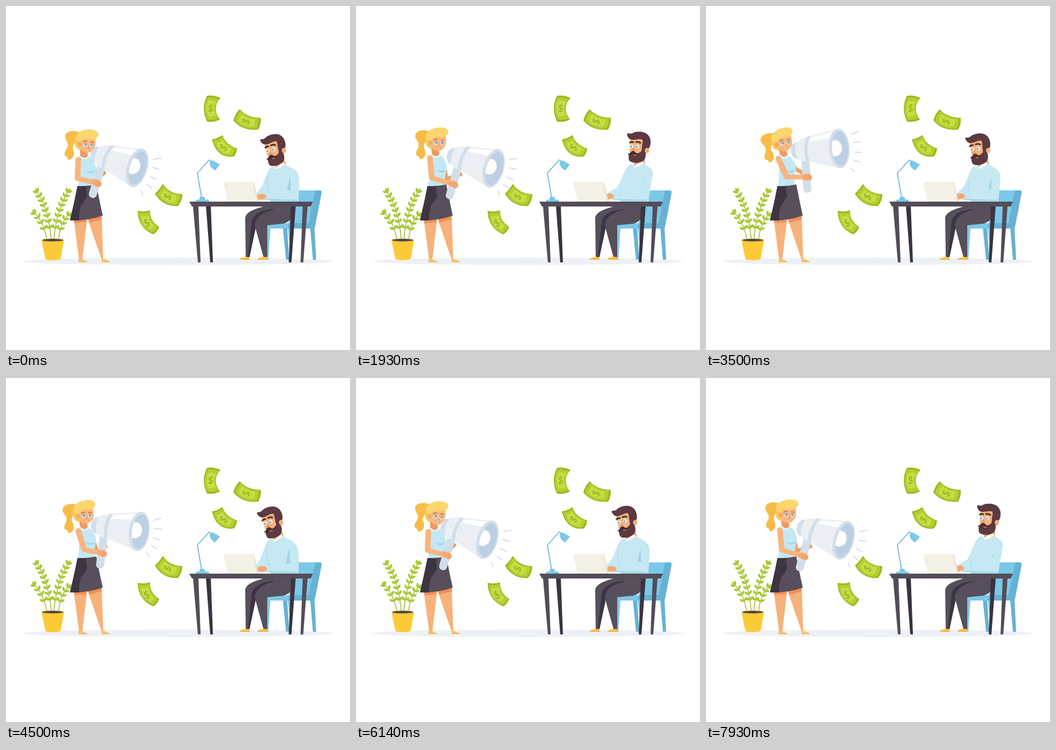
Recreate the animation shown at these times as an HTML page. Size 640 by 640 pixels, loop 8000 ms.

```html
<!DOCTYPE html>
<html lang="en">
<head>
<meta charset="utf-8">
<title>Promotion</title>
<style>
html,body{margin:0;width:100%;height:100%;overflow:hidden;background:#fff}
svg{display:block;width:100vw;height:100vh}
</style>
</head>
<body>
<svg viewBox="0 0 640 640">
<defs><clipPath id="mouth"><ellipse cx="1.5" rx="15" ry="32"/></clipPath></defs>
<ellipse cx="320" cy="475" rx="288" ry="7" fill="#edf0f4"/>

<g id="plant"></g>
<path d="M66 436H108L102 469Q101 473 87 473T73 469Z" fill="#fbcb37"/>
<ellipse cx="87" cy="436" rx="21" ry="3.2" fill="#fbcb37"/>
<ellipse cx="87" cy="435.6" rx="19.5" ry="2.5" fill="#5c4543"/>
<g id="sprouts"></g>

<g id="bills"></g>

<!-- chair -->
<path d="M566 412H574L577 472H571ZM515 412H523L527 472H521Z" fill="#66b2d4"/>
<path d="M486 412H492L488 472H484ZM538 412H531L527 440 524 412Z" fill="#7cc8e8"/>
<path d="M530 343H583Q588 343 587 348L575 410Q574 414 569 414H486V404H526Z" fill="#7cc8e8"/>
<path d="M575 343H583Q588 343 587 348L575 410Q574 414 569 414H524L526 404H563Z" fill="#66b2d4"/>

<!-- seated legs -->
<path d="M482 372C462 378 446 383 445 395L446 467H453L466 400 505 380Z" fill="#574f5b"/>
<path d="M498 378C475 379 459 388 457 402L450 467H453L467 402 500 392Z" fill="#3d3542"/>
<path d="M480 372H537Q536 400 516 405L486 408 486 467H479L463 409C463 395 476 383 500 379Z" fill="#574f5b"/>
<path id="shoeB" d="M435 472Q437 467 447 467H453V472Z" fill="#fcc23c"/>
<path d="M435 471H453V472H435Z" fill="#ee9c3a"/>
<g id="toe"><path d="M468 472Q470 467 480 467H487V472Z" fill="#fcc23c"/><path d="M468 471H487V472H468Z" fill="#ee9c3a"/></g>

<!-- man -->
<g id="neckM"><path d="M-25 15L-4 4-3 26-22 29Z" fill="#ee9a62"/></g>
<path id="torsoM" fill="#c5e8f3"/>
<path id="foldM" fill="#9fd5e6"/>
<path id="seamM" fill="none" stroke="#a8dae9" stroke-width="1"/>
<path d="M479 358.5L541 360.5 545 364H476Z" fill="#a5d8e8"/>
<path id="collarM" fill="#fff"/>
<g id="headM">
<path d="M-32-21H-7L-3 6-12 18-32 12Z" fill="#f8b27a"/>
<path d="M-38-30C-36-33-32-28-27-32C-20-36-4-36 2-28C7-22 7-14 5-7L1-1-7 1-9-20C-16-23-24-17-32-20C-35-21-38-26-38-30Z" fill="#5b3a41"/>
<path d="M-9-14L-2-8-2 10Q-3 18-9 21Q-22 26-31 21Q-35 18-33 7Q-28 3-24 5Q-17 8-10 1Z" fill="#5b3a41"/>
<path d="M-27 8Q-22 5-17 8Q-21 12-27 8Z" fill="#f2a36c"/>
<path d="M-36 7Q-33 8-28 2Q-25 0-22 3Q-18 8-13 6Q-17 11-24 8Q-32 12-36 7Z" fill="#4a2e35"/>
<path d="M-25-7L-28 0Q-27 3-23 1Z" fill="#ee945f"/>
<circle cx="-29" cy="-7" r="3.3" fill="#fff"/><circle cx="-18" cy="-7" r="3.4" fill="#fff"/>
<circle cx="-29.6" cy="-6.7" r="2" fill="#5ea6dc"/><circle cx="-18.8" cy="-6.7" r="2" fill="#5ea6dc"/>
<path d="M-33-13Q-29-17-25-14M-22-15Q-16-17-12-13" fill="none" stroke="#4a2e35" stroke-width="3"/>
<ellipse rx="4" ry="5" fill="#f8b27a"/><path d="M-1-2Q2-2 1 2" fill="none" stroke="#ee945f"/>
</g>
<g id="handM" fill="#f5a86e"><ellipse rx="9" ry="5.2"/><path d="M-10 6Q-9-1-2-1L3 5Q-4 7-10 6Z"/></g>

<!-- desk -->
<path d="M468 360L491 361 493 364H466Z" fill="#f7f6f0"/>
<path d="M407 328H459Q461 328 462 330L470 364H413L405 331Q405 328 407 328Z" fill="#e4e1d2"/>
<path d="M407 328.500H457Q459 328.500 460 330L467 364H412L405 331Q405 328.500 407 328.500Z" fill="#f3f1e5"/>
<path d="M364 357L356 311 378 286.500 385 290" fill="none" stroke="#67b5d9" stroke-width="1.7"/>
<path d="M353 364Q353 360 357 360H360V357Q360 355 362 355H368Q370 355 370 357V360H374Q378 360 378 364ZM379 292Q380 287 386 288L398 295 389 306Q379 300 379 292Z" fill="#7cc8e8"/>
<path d="M372 372H381L385 477H380ZM530 372H539L531 477H526Z" fill="#3b3340"/>
<path d="M341 364H571L567 373H346ZM348 373H358L362 477H357ZM552 373H561L553 477H548Z" fill="#544c58"/>

<!-- woman: legs -->
<path d="M126 396H151L142 472H136ZM152 396L178 390 181 472H178Z" fill="#f6b27a"/>
<path d="M126 398H150L149 402 127 404ZM153 397L178 391V397L155 403Z" fill="#f08f58"/>
<path d="M135 471H142L151 475.500H135ZM178 471H184L193 475.500H178Z" fill="#fcc758"/>
<path d="M135 475H151V476.300H135ZM178 475H193V476.300H178Z" fill="#eda03f"/>

<path id="farArm" fill="none" stroke="#ee9f66" stroke-width="7.500" stroke-linecap="round" stroke-linejoin="round"/>
<g id="headW">
<path d="M136 235C124 230 111 233 110 242C110 250 117 254 115 261C113 267 108 270 109 277C111 281 115 279 114 283C114 286 118 287 122 284C128 279 127 272 125 267C122 260 129 252 136 246Z" fill="#f7bc47"/>
<path d="M138 262H152V280Q145 286 138 280Z" fill="#f09a62"/>
<path d="M130 244C132 231 160 225 170 236L166 248H142L139 268C130 268 125 255 130 244Z" fill="#f6ca57"/>
<path d="M139 245H166Q168 258 164 265Q158 274 150 273Q139 271 138 262Z" fill="#f9b980"/>
<ellipse cx="137" cy="257" rx="3.500" ry="4.500" fill="#f4a66f"/>
<path d="M130 243C132 228 170 225 172 238C173 245 163 249 156 248C149 247 142 246 140 253C134 254 130 249 130 243Z" fill="#fbd66c"/>
<path d="M143.500 253Q147 250 151 252M157 253.500Q160 252 163 255" fill="none" stroke="#b5703c" stroke-width="1.600"/>
<g id="eyesOpen">
<circle cx="147.500" cy="258" r="3.200" fill="#fff"/><circle cx="158.500" cy="259.500" r="3.200" fill="#fff"/>
<circle cx="148" cy="258" r="2.100" fill="#5a9fd8"/><circle cx="159" cy="259.500" r="2.100" fill="#5a9fd8"/>
<path d="M144 256.500Q147 253.500 151 256.500M155.500 257.500Q159 255 162 258" fill="none" stroke="#9b6a50" stroke-width=".8"/>
</g>
<g id="eyesShut" fill="none" stroke="#b5764b" stroke-width="1"><path d="M144 258Q147.500 261 151 258M155.500 259Q159 262 162 260"/></g>
<path d="M154 259L155.500 264H152" fill="none" stroke="#ee945f" stroke-width="1.300"/>
<path d="M146 266Q151 269 156 268Q151 273 146 266Z" fill="#fff" stroke="#e2774f" stroke-width=".6"/>
</g>
<g id="torsoW">
<path d="M136 281L139 279Q146 286 153 280Q161 284 164 292Q169 300 167 308Q164 316 165 334L134 336Q137 316 136 281Z" fill="#c3e8f4"/>
<path d="M139 279Q146 286 153 280L154 282Q146 289 137 281Z" fill="#e8f6fb"/>
<path d="M146 306Q157 310 165 306Q160 316 146 306Z" fill="#9dd5e8"/>
</g>
<path d="M133 335Q150 336 168 332Q174 363 180 390Q152 400 119 399Q127 366 133 335Z" fill="#574f5b"/>
<path d="M133 335L150 335.500Q148 346 151 353Q148 362 140 370Q135 385 136 399L119 399Q127 366 133 335Z" fill="#3d3542"/>

<g id="mega">
<rect x="-72" y="8" width="15" height="70" rx="7" fill="#d2dee9"/>
<path d="M-77-17C-95-18-95 14-77 15Z" fill="#d2dee9"/>
<path d="M-79-17Q-72-23-57-25L-60 21Q-72 19-79 14Q-84-2-79-17Z" fill="#ebeff4"/>
<path d="M-56-26L2-37-3 36-60 20Q-64-4-56-26Z" fill="#ebeff4"/>
<path d="M-50-24L-4-33Q-11-28-14-20L-56-17Z" fill="#fff"/>
<path d="M-53-27Q-63-4-57 21L-64 19Q-69-4-60-25Z" fill="#d2dee9"/>
<ellipse rx="19" ry="37" fill="#d2dee9"/>
<ellipse cx="1.500" rx="15" ry="32" fill="#bdcfe3"/>
<ellipse cx="-8" cy="-1" rx="13" ry="15" fill="#fff" clip-path="url(#mouth)"/>
<path d="M23.700-23.600L37.500-30M26-8.800L41.500-9.400M27 8.200L40.500 11M25.500 23.500L37.500 28.500M19 38L25.500 45.500" stroke="#cbd9e6" stroke-width="1.700" fill="none"/>
</g>
<path id="foreArm" fill="none" stroke="#f8b57e" stroke-width="9" stroke-linecap="round"/>
<path id="upperArm" fill="none" stroke="#f8b57e" stroke-width="10.500" stroke-linecap="round"/>
<g id="handW"><path d="M-10-4Q0-8 6-5L9-2Q11 3 7 6Q-1 7-8 4Z" fill="#f5a970"/><path d="M2-1H9M2 2.500H8" stroke="#ea8e57" stroke-width=".8"/></g>
</svg>
<script>
const $ = id => document.getElementById(id);
const set = (id, attr, v) => $(id).setAttribute(attr, v);

// Plant: leaf pairs along quadratic stems
function stem([x0, y0, cx, cy, x1, y1], n) {
  let s = `<path d="M${x0} ${y0}Q${cx} ${cy} ${x1} ${y1}" fill="none" stroke="#9dbb2f" stroke-width="1.5"/>`;
  for (let i = 1; i <= n; i++) {
    const u = .08 + .9 * i / n, v = 1 - u;
    const x = v * v * x0 + 2 * u * v * cx + u * u * x1;
    const y = v * v * y0 + 2 * u * v * cy + u * u * y1;
    const a = Math.atan2(v * (cy - y0) + u * (y1 - cy), v * (cx - x0) + u * (x1 - cx)) * 180 / Math.PI;
    for (const d of i === n ? [-40, 8, 40] : [-46, 46])
      s += `<path d="M0 0Q5-5.500 10 0Q5 4 0 0" fill="#a9c934" transform="translate(${x} ${y})rotate(${a + d})"/>`;
  }
  return s;
}
$('plant').innerHTML = stem([84, 434, 80, 380, 58, 346], 8) + stem([89, 434, 94, 380, 115, 346], 8);
$('sprouts').innerHTML = stem([76, 434, 70, 402, 54, 386], 4) + stem([98, 434, 101, 404, 115, 390], 4);

// Banknotes: outline, centre, rotation of the sign
const bills = [
  ['M374 167Q386 165 399 171Q382 190 398 211Q387 217 374 215Q362 190 374 167Z', 380.500, 190.500, 6],
  ['M435 192Q448 208 474 208Q475 220 469 230Q440 233 423 213Q426 200 435 192Z', 447, 215, -63],
  ['M403 240Q408 258 430 265Q429 274 424 280Q392 284 383 248Q393 247 403 240Z', 405, 264, -50],
  ['M292 331Q303 349 328 350Q328 363 320 372Q292 374 277 349Q285 342 292 331Z', 301, 355, -60],
  ['M268 380Q267 400 285 411Q282 420 274 425Q245 412 245 381Q257 384 268 380Z', 262, 404, -28]
];
$('bills').innerHTML = bills.map(([d, x, y, r]) => {
  const layer = (k, fill) => `<path d="${d}" fill="${fill}" transform="translate(${x} ${y})scale(${k})translate(${-x} ${-y})"/>`;
  return layer(1, '#9ab81d') + layer(.86, '#b3cf30') + layer(.6, '#c5de45') +
    `<text transform="translate(${x} ${y})rotate(${r})" y="6" text-anchor="middle" font-family="Lato,sans-serif" font-size="18" fill="#8fae16">$</text>`;
}).join('');

// Poses repeat every 6 s
const cycle = 6, marks = [0, .79, 1.21, 1.93, 2.5, 3.5, 4.4, 5.5];
const pose = {
  x: [244, 249, 253, 256, 252, 248, 248, 246],
  y: [301, 301, 304, 302, 281, 265, 283, 309],
  tilt: [17, 16, 17, 16, 6, -4, 6, 19],
  neckX: [0, 1.5, 3, 3, .5, 0, 0, .5],
  neckY: [0, -2, -3, -3, -2, -2, -1.5, 0],
  nod: [0, -2, -4, -4.5, -9, -15, -9, 1],
  elbowX: [133, 137, 140, 141, 147, 150, 146, 133],
  elbowY: [321, 320, 320, 320, 318, 318, 319, 322],
  lean: [.235, .65, .91, .95, 1, .47, .1, 0]
};
function ease(v, t) {
  const n = marks.length;
  let i = n - 1;
  while (marks[i] > t) i--;
  const at = k => marks[(k + n) % n] + cycle * Math.floor(k / n);
  const val = k => v[(k + n) % n];
  const slope = k => {
    const a = (val(k) - val(k - 1)) / (at(k) - at(k - 1));
    const b = (val(k + 1) - val(k)) / (at(k + 1) - at(k));
    return a * b <= 0 ? 0 : 2 * a * b / (a + b);
  };
  const h = at(i + 1) - at(i), u = (t - at(i)) / h, w = 1 - u;
  return w * w * (1 + 2 * u) * val(i) + u * u * (3 - 2 * u) * val(i + 1) +
    h * u * w * (w * slope(i) - u * slope(i + 1));
}

function woman(t, p) {
  const a = p.tilt * Math.PI / 180, c = Math.cos(a), s = Math.sin(a);
  const held = (x, y) => [p.x + x * c - y * s, p.y + x * s + y * c];
  const sx = p.neckX / 54, sy = p.neckY / 54;
  set('torsoW', 'transform', `matrix(1 0 ${-sx} ${1 - sy} ${334 * sx} ${334 * sy})`);
  set('headW', 'transform', `translate(${p.neckX} ${p.neckY})rotate(${p.nod} 145 279)`);
  set('mega', 'transform', `translate(${p.x} ${p.y})rotate(${p.tilt})`);
  const hand = held(-64, 49), up = 17 - p.tilt;
  const bend = 322 - Math.max(0, 6 - p.tilt) * 1.8;
  set('farArm', 'd', `M${161 + p.neckX} 295L168 ${bend}L${held(-56 - up * .3, 27 + up * .9)}`);
  set('upperArm', 'd', `M${134.500 + p.neckX} ${286 + p.neckY}L${p.elbowX} ${p.elbowY - 1}`);
  set('foreArm', 'd', `M${p.elbowX} ${p.elbowY}L${hand}`);
  set('handW', 'transform', `translate(${hand})rotate(${p.tilt})`);
  const shut = Math.abs(t - 1.21) < .1;
  set('eyesShut', 'opacity', shut ? 1 : 0);
  set('eyesOpen', 'opacity', shut ? 0 : 1);
}

function man(t, m) {
  const pt = (x0, y0, x1, y1) => `${x0 + (x1 - x0) * m} ${y0 + (y1 - y0) * m} `;
  const ear = 509 + 34 * m, turn = -18.5 + 17 * m + 5 * m ** 3;
  set('headM', 'transform', `translate(${ear} 269)rotate(${turn})`);
  set('neckM', 'transform', `translate(${ear} 269)rotate(${turn})`);
  set('torsoM', 'd', 'M' + pt(490, 300, 512, 294) + 'Q' + pt(482, 305, 504, 299) + pt(479, 318, 499, 312) +
    'L' + pt(473, 334, 487, 338) + 'L' + pt(465, 350, 468, 348) + 'L' + pt(474, 361, 476, 360) +
    'L480 363H544L' + pt(545, 336, 548, 338) + 'L' + pt(543, 322, 553, 310) +
    'Q' + pt(540, 309, 553, 306) + pt(532, 304, 550, 303) + 'L' + pt(511, 294, 536, 292) +
    'Q' + pt(500, 304, 524, 301) + pt(490, 300, 512, 294) + 'Z');
  set('foldM', 'd', 'M' + pt(519, 346, 533, 333) + 'L' + pt(529, 346, 534.5, 333) + 'L' + pt(526, 315, 536, 324) + 'Z');
  set('seamM', 'd', 'M' + pt(485, 308, 495, 343) + 'Q' + pt(482, 325, 492, 347) + pt(489, 350, 491, 352));
  set('collarM', 'd', 'M' + pt(488, 300, 510, 294) + 'L' + pt(494, 305, 517, 300) + 'L' + pt(499, 300, 523, 294) +
    'L' + pt(511, 291, 535, 289) + 'L' + pt(513, 296, 537, 293) + 'L' + pt(499, 304, 523, 300) +
    'L' + pt(494, 305, 517, 300) + 'L' + pt(488, 300, 510, 294) + 'Z');
  const tap = Math.sin(t * 14) * .9;
  set('handM', 'transform', `translate(${477 - 7 * m + tap} ${355 - 1.5 * m + tap * .5})`);
  const lift = t > 1.8 && t < 4.3 ? 9 * Math.sin((t - 1.8) / 2.5 * Math.PI * 3) ** 2 : 0;
  set('toe', 'transform', `rotate(${lift} 486 471)`);
}

function draw() {
  const t = performance.now() % 8000 / 1000 % cycle, p = {};
  for (const k in pose) p[k] = ease(pose[k], t);
  woman(t, p);
  man(t, p.lean);
  requestAnimationFrame(draw);
}
draw();
</script>
</body>
</html>
```
